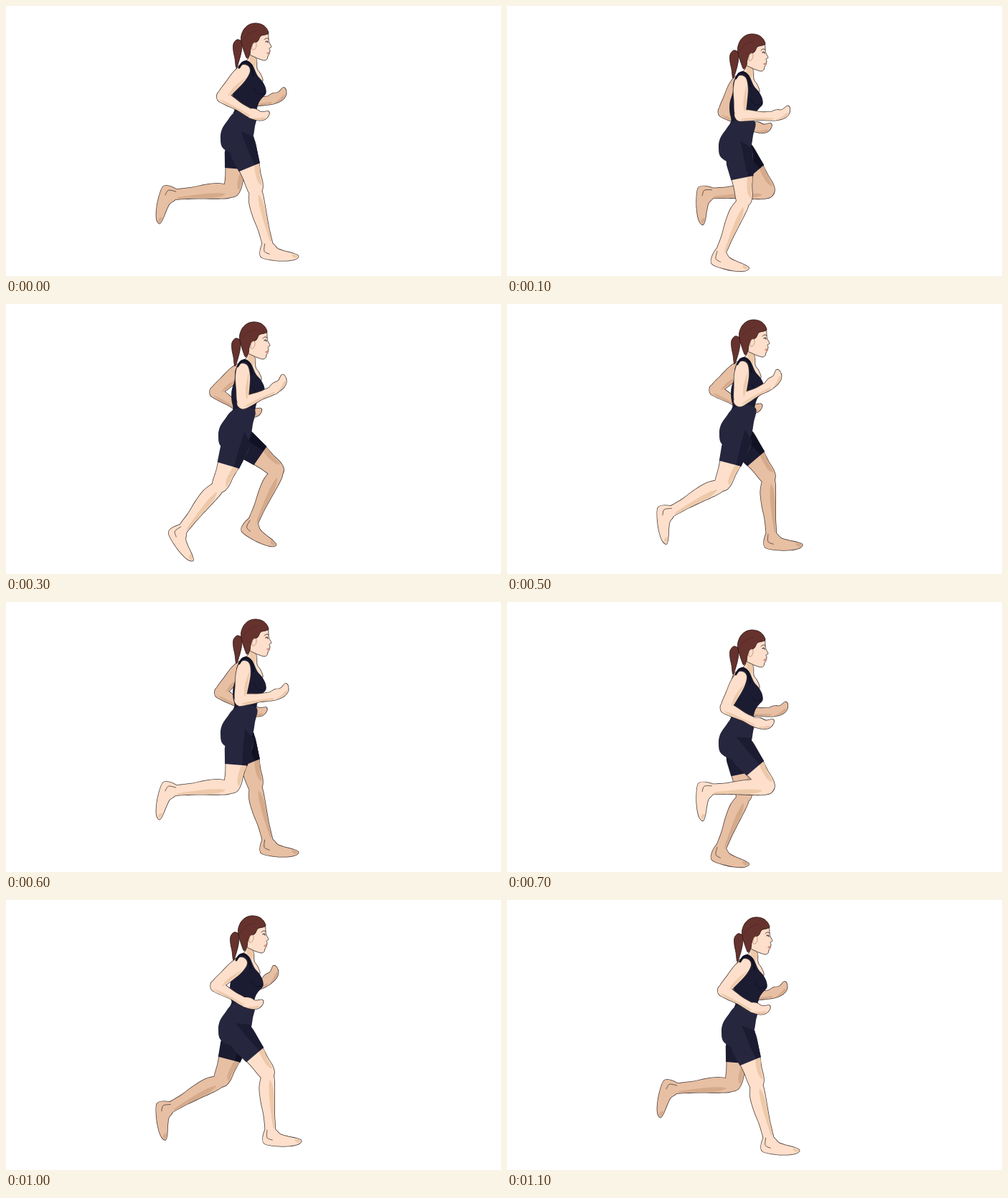
These frames come from a looping animation (690 px wide and 377 px high, 1.2 s). An HTML page with a canvas:

```html
<!DOCTYPE html>
<html lang="en">
<head>
<meta charset="utf-8">
<title>Running woman</title>
<style>
html, body { margin: 0; width: 100%; height: 100%; overflow: hidden; background: #fff; }
canvas { display: block; width: 690px; height: 377px; }
</style>
</head>
<body>
<canvas id="stage" width="690" height="377"></canvas>
<script>
const ctx = document.getElementById('stage').getContext('2d');
const LINE = '#4a3c38';
const HAIR = '#66322d';
const HAIR_LINE = '#321a18';
const SUIT = { light: '#26263e', base: '#1b1b32', dark: '#111124' };
const NEAR = { skin: '#fddfcb', shade: '#edc9a9', suit: SUIT.light, fold: SUIT.base };
const FAR = { skin: '#e7bfa3', shade: '#d5aa8b', suit: SUIT.base, fold: SUIT.dark };

// The stride has ten stages; the far limbs run half a cycle behind the near ones.
// Angles are in degrees: 0 points forward, 90 points down.
const STRIDE = {
  thigh: [73, 84, 96, 112, 110, 100, 55, 36, 40, 55],
  shin: [77, 114, 122, 130, 152, 177, 179, 145, 116, 87],
  foot: [20, 28, 51, 70, 98, 117, 104, 67, 43, 17],
  upperArm: [130, 91, 98, 90, 95, 97, 116, 137, 138, 138],
  forearm: [31, 2, -9, -23, -27, -7, 27, 36, 33, 30]
};
const WRIST_BEND = -18;

// Body shifts, the same in both halves of the stride.
const CHEST = [[0, 0], [-6, 15], [-3, 9], [-2, 1], [-4, -2]];
const HIPS = [[0, 0], [-4, 13], [-7, 6], [-3, 0], [-3, -3]];

// Stage shown in each tick of the loop.
const TICK = 100;
const TICKS = [0, 1, 2, 3, 3, 4, 5, 6, 7, 7, 9, 0];

const HIP = [326, 188];
const SHOULDER = [332, 90];
const FAR_SHOULDER = [329, 90];

// Smooth Catmull-Rom path through the points.
function curve(text, open) {
  const p = text.split(' ').map(Number);
  const n = p.length / 2;
  const path = new Path2D();
  const at = (i, k) => p[2 * (open ? Math.max(0, Math.min(n - 1, i)) : (i + n) % n) + k];
  const lead = (i, k) => at(i, k) + (at(i + 1, k) - at(i - 1, k)) / 6;
  const trail = (i, k) => at(i, k) - (at(i + 1, k) - at(i - 1, k)) / 6;
  path.moveTo(p[0], p[1]);
  for (let i = 0; i < (open ? n - 1 : n); i++) {
    path.bezierCurveTo(lead(i, 0), lead(i, 1), trail(i + 1, 0), trail(i + 1, 1), at(i + 1, 0), at(i + 1, 1));
  }
  if (!open) path.closePath();
  return path;
}
const line = text => curve(text, true);

// Bones lie along x; the front of the limb is at negative y.
const bone = (length, skin, shade) => ({ length, skin: curve(skin), shade: curve(shade) });

const LEG = [
  bone(72, '0 -17 30 -17 52 -14 66 -13 76 -9 80 0 76 8 66 10 52 11 30 14 0 14',
    '40 -16 53 -13 68 -11 60 -7 40 -9'),
  bone(80, '-6 -5 4 -9 18 -9 36 -8 56 -7 72 -7 82 -6 82 6 72 7 56 8 36 11 18 12 4 9 -6 5',
    '8 -3 30 -1 72 -4 72 -6.5 56 -6.5 36 -7.5 18 -7'),
  bone(40, '-6 -6 6 -5 14 -1 25 -1 37 -2 45 -1 42 5 31 11 15 16 -3 18 -8 8',
    '36 -1 44 -0.5 41 3 37 2')
];
const ANKLE = line('-5 -1 -2 9 6 10');

const ARM = [
  bone(47, '-8 0 -4 -7 10 -10 28 -9 44 -7 52 -2 50 5 44 8 28 9 10 10 -4 7',
    '6 -8 28 -8 42 -6 28 -4'),
  bone(46, '-8 0 -3 -7 10 -7 28 -5 46 -5 50 0 46 6 28 6 10 8 -3 8',
    '0 6 12 4 44 3 45 5 28 5.5 10 7'),
  bone(22, '-3 -5 6 -7 14 -5 23 -8 25 -3 21 4 14 7 4 7 -3 5',
    '4 6 12 4 20 1 20 4 14 6.5')
];

const LEGGING = new Path2D('M-14 0L0-20L20-19L38-17.5L41 14L20 18L0 18Z');
const CREASE = new Path2D('M-12-5L0-20L20-19L38-17.5L38-10L14-7Z');

const BODY = {
  neck: curve('340 62 338 73 329 81 324 92 334 106 350 110 358 105 355 95 350 87 349 74'),
  neckShade: curve('341 66 349 75 348 82 344 90 340 80'),
  torso: curve('327 82 322 92 321 106 317 120 317 134 319 144 317 154 330 160 347 156 349 145 352 135 357 128 362 122 361 113 356 104 350 97 345 86 341 80 333 79'),
  bust: line('345 114 352 123 361 121'),
  strap: line('325 86 330 79 337 78 342 84 345 97'),
  pelvis: curve('318 149 308 161 301 172 299 184 302 198 318 206 336 198 344 184 347 168 350 149 334 144')
};

const HEAD = {
  face: curve('344 32 358 31 365 37 366 46 367 51 370 57 367 59 368 62 367 67 365 70 364 74 360 76 353 74 346 71 339 66 338 50'),
  hair: curve('328 50 328 41 332 32 339 26 348 24 357 26 363 31 366 38 362 40 355 42 351 49 344 53 341 60 340 67 336 73 332 64'),
  tail: curve('328 49 322 47 317 53 317 63 319 73 321 86 325 76 328 64 329 54'),
  ear: curve('344 53 348 51 349 56 346 61 343 60'),
  brow: line('360 47 363 45 366 46'),
  eye: line('362 50 364 49 365 51'),
  lips: curve('363 66 367 64 367 68'),
  strands: line('331 47 338 39 350 34')
};

function paint(path, fill, stroke, width = 0.9) {
  if (fill) { ctx.fillStyle = fill; ctx.fill(path); }
  if (stroke) { ctx.strokeStyle = stroke; ctx.lineWidth = width; ctx.stroke(path); }
}

function shifted([x, y], draw) {
  ctx.save();
  ctx.translate(x, y);
  draw();
  ctx.restore();
}

// Places each bone at the end of the one before it.
function chain([x, y], bones, angles) {
  return bones.map((b, i) => {
    const place = new DOMMatrix().translate(x, y).rotate(angles[i]);
    ({ x, y } = place.transformPoint({ x: b.length, y: 0 }));
    return place;
  });
}

function moved(path, place) {
  const out = new Path2D();
  out.addPath(path, place);
  return out;
}

function drawLimb(bones, places, tone) {
  const skin = new Path2D(), shade = new Path2D();
  bones.forEach((b, i) => {
    skin.addPath(b.skin, places[i]);
    shade.addPath(b.shade, places[i]);
  });
  paint(skin, null, LINE, 1.6);
  paint(skin, tone.skin);
  paint(shade, tone.shade);
}

function drawLeg(stage, tone, hips) {
  const angles = [STRIDE.thigh, STRIDE.shin, STRIDE.foot].map(a => a[stage]);
  const places = chain(HIP.map((v, k) => v + hips[k]), LEG, angles);
  drawLimb(LEG, places, tone);
  paint(moved(ANKLE, places[2]), null, LINE, 0.8);
  if (tone === NEAR) shifted(hips, () => paint(BODY.pelvis, SUIT.light));
  paint(moved(LEGGING, places[0]), tone.suit);
  paint(moved(CREASE, places[0]), tone.fold);
}

function drawArm(stage, tone, shoulder) {
  const fore = STRIDE.forearm[stage];
  drawLimb(ARM, chain(shoulder, ARM, [STRIDE.upperArm[stage], fore, fore + WRIST_BEND]), tone);
}

function drawTorso() {
  paint(BODY.neck, NEAR.skin, LINE);
  paint(BODY.neckShade, NEAR.shade);
  paint(BODY.torso, SUIT.base, SUIT.dark);
  paint(BODY.bust, null, SUIT.dark);
}

function drawHead() {
  paint(HEAD.tail, HAIR, HAIR_LINE);
  paint(HEAD.face, NEAR.skin, LINE);
  paint(HEAD.hair, HAIR, HAIR_LINE);
  paint(HEAD.strands, null, '#522823', 0.7);
  paint(HEAD.ear, NEAR.skin, '#a67d68', 0.7);
  paint(HEAD.brow, null, '#4c2a25');
  paint(HEAD.eye, null, '#33282a', 1.2);
  paint(HEAD.lips, '#d39284');
}

function drawRunner(stage) {
  const far = (stage + 5) % 10;
  const chest = CHEST[stage % 5], hips = HIPS[stage % 5];
  shifted(chest, () => drawArm(far, FAR, FAR_SHOULDER));
  drawLeg(far, FAR, hips);
  shifted(chest, drawTorso);
  drawLeg(stage, NEAR, hips);
  shifted(chest, () => {
    drawArm(stage, NEAR, SHOULDER);
    paint(BODY.strap, null, SUIT.dark, 2.8);
    drawHead();
  });
}

const begin = performance.now();

function frame() {
  const tick = Math.floor((performance.now() - begin) / TICK) % TICKS.length;
  ctx.fillStyle = '#fff';
  ctx.fillRect(0, 0, 690, 377);
  drawRunner(TICKS[tick]);
  requestAnimationFrame(frame);
}

ctx.lineJoin = ctx.lineCap = 'round';
frame();
</script>
</body>
</html>
```
